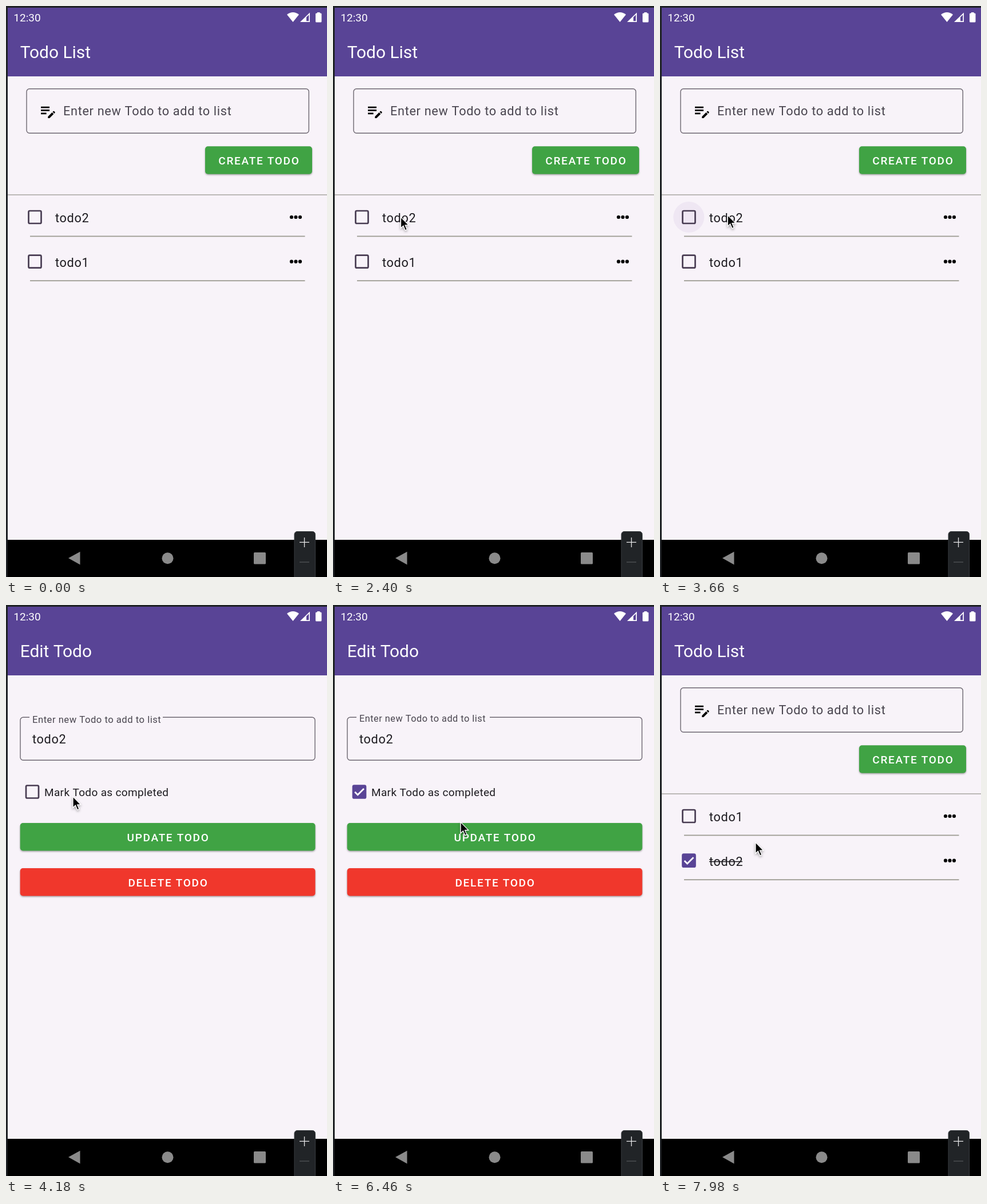
An HTML page with a canvas for the animation above (8 s loop, 561 by 998 pixels).

```html
<!DOCTYPE html>
<html lang="en">
<head>
<meta charset="utf-8">
<title>Todo app</title>
<style>
html, body { margin: 0; width: 100%; height: 100%; overflow: hidden; background: #202124; }
canvas { display: block; }
</style>
</head>
<body>
<canvas id="stage" width="561" height="998"></canvas>
<script>
const ctx = document.getElementById('stage').getContext('2d');
const LOOP = 8000;
const PURPLE = '#594496', PAPER = '#f8f3f9', INK = '#1d1b20', GREEN = '#40a344', RED = '#f0372c';
const HINT = 'Enter new Todo to add to list';

const clamp = v => Math.max(0, Math.min(1, v));
const progress = (t, start, end) => clamp((t - start) / (end - start));
const smooth = p => p * p * (3 - 2 * p);
const easeOut = p => 1 - (1 - p) ** 2;
const mix = (a, b, p) => a + (b - a) * p;

// Cursor stops: time, x, y
const cursorStops = [
  [900, 240, 0], [1380, 127.5, 349], [1580, 123, 364], [2300, 118.5, 369],
  [3560, 118.5, 369], [4080, 117, 335], [5900, 117, 335],
  [6650, 243, 388], [7300, 243, 388], [7900, 167, 415]
];

function text(str, x, y, size, color, { weight = 400, spacing = 0, align = 'left' } = {}) {
  ctx.font = `${weight} ${size}px Roboto, sans-serif`;
  ctx.letterSpacing = spacing * size + 'px';
  ctx.textAlign = align;
  ctx.fillStyle = color;
  ctx.fillText(str, x, y);
}

function rect(x, y, w, h, color) {
  ctx.fillStyle = color;
  ctx.fillRect(x, y, w, h);
}

function roundRect(x, y, w, h, r) {
  ctx.beginPath();
  ctx.roundRect(x, y, w, h, r);
}

function circle(x, y, r, color) {
  ctx.beginPath();
  ctx.arc(x, y, r, 0, 7);
  ctx.fillStyle = color;
  ctx.fill();
}

function polygon(points, color) {
  ctx.beginPath();
  points.forEach(([x, y]) => ctx.lineTo(x, y));
  ctx.closePath();
  ctx.fillStyle = color;
  ctx.fill();
}

function line(points, color, width) {
  ctx.beginPath();
  points.forEach(([x, y]) => ctx.lineTo(x, y));
  ctx.strokeStyle = color;
  ctx.lineWidth = width;
  ctx.stroke();
}

function outline(x, y, w, h) {
  roundRect(x, y, w, h, 5);
  ctx.strokeStyle = '#6c6670';
  ctx.lineWidth = 1.4;
  ctx.stroke();
}

function button(label, x, y, w, color, lift = 0, overlay) {
  const h = 48.5;
  ctx.save();
  ctx.shadowColor = `rgba(0,0,0,${mix(0.35, 0.3, lift)})`;
  ctx.shadowBlur = mix(3, 11, lift);
  ctx.shadowOffsetY = mix(1.5, 5, lift);
  roundRect(x, y, w, h, 5);
  ctx.fillStyle = color;
  ctx.fill();
  ctx.restore();
  if (overlay) {
    ctx.save();
    roundRect(x, y, w, h, 5);
    ctx.clip();
    overlay();
    ctx.restore();
  }
  text(label, x + w / 2 + 0.9, y + 32, 19, '#fff', { weight: 500, spacing: 0.0893, align: 'center' });
}

function checkbox(x, y, checked) {
  roundRect(x - 11, y - 11, 22, 22, 2);
  if (checked) {
    ctx.globalAlpha *= mix(0.6, 1, checked);
    ctx.fillStyle = PURPLE;
    ctx.fill();
    ctx.globalAlpha /= mix(0.6, 1, checked);
  }
  ctx.strokeStyle = checked ? PURPLE : '#483c52';
  ctx.lineWidth = 2.7;
  ctx.stroke();
  if (checked) {
    ctx.save();
    ctx.translate(x - 2 * (1 - checked), y + 1.5 * (1 - checked));
    ctx.scale(checked, checked);
    line([[-7.8, 0.3], [-2.8, 5.3], [8, -5.5]], '#fff', 2.7);
    ctx.restore();
  }
}

function statusBar() {
  rect(3, 3, 558, 120, PURPLE);
  text('12:30', 13.3, 27, 19, '#fff');
  ctx.beginPath();
  ctx.moveTo(501.5, 28);
  ctx.lineTo(491, 15);
  ctx.quadraticCurveTo(501.5, 7, 512, 15);
  ctx.closePath();
  ctx.fillStyle = '#fff';
  ctx.fill();
  polygon([[514, 28], [531, 11.5], [531, 28]], '#fff');
  polygon([[525, 19.5], [529.3, 15.5], [529.3, 26.3], [525, 26.3]], PURPLE);
  roundRect(541, 12.5, 10.5, 16, 1.5);
  ctx.fillStyle = '#fff';
  ctx.fill();
  rect(544, 11, 4.5, 3, '#fff');
}

function page(title) {
  rect(3, 123, 558, 810, PAPER);
  statusBar();
  text(title, 24.7, 91, 29.86, '#fff');
}

function todoRow(label, y, done) {
  checkbox(50.5, y, done ? 1 : 0);
  text(label, 86, y + 9, 21.7, INK, { spacing: 0.03125 });
  if (done) rect(86, y + 1, 58, 1.6, INK);
  for (const x of [499, 506.5, 514]) circle(x, y, 3.1, '#000');
  rect(42, y + 32.6, 480.5, 1.8, '#9c9b91');
}

const noteIcon = new Path2D('M3 10h11v2H3zM3 8h11V6H3zM3 16h7v-2H3zM18 12.9l.7-.7c.4-.4 1-.4 1.4 0l.7.7c.4.4.4 1 0 1.4l-.7.7zM17.3 13.6l-5.3 5.3V21h2.1l5.3-5.3z');

function listPage(t) {
  page('Todo List');
  outline(36, 144.8, 493.3, 77.5);
  ctx.save();
  ctx.translate(57, 167.5);
  ctx.scale(1.36, 1.36);
  ctx.fillStyle = '#000';
  ctx.fill(noteIcon);
  ctx.restore();
  text(HINT, 100, 191, 21.7, '#49454f', { spacing: 0.03125 });
  button('CREATE TODO', 348, 245.3, 187, GREEN);
  rect(3, 329.4, 558, 1.3, '#9c9b95');

  if (t > 3160 && t < 3800) {
    const p = easeOut(progress(t, 3160, 3340));
    const fade = 1 - progress(t, 3550, 3800);
    circle(50.3, 369, 27 * p, `rgba(95,60,155,${0.11 * fade})`);
  }
  const completed = t > 6000;
  todoRow(completed ? 'todo1' : 'todo2', 369, false);
  todoRow(completed ? 'todo2' : 'todo1', 446.7, completed);
}

function updateRipple(t) {
  const fade = 1 - progress(t, 7230, 7420);
  [[0, 0.2], [14, 0.25]].forEach(([delay, alpha]) => {
    const p = easeOut(progress(t, 6903 + delay, 7203 + delay));
    if (p) circle(mix(243, 282.5, p), 405, 262 * p, `rgba(255,255,255,${alpha * fade})`);
  });
}

function editPage(t) {
  page('Edit Todo');
  outline(25, 196.3, 515, 75);
  rect(41, 194, 233, 5, PAPER);
  const label = easeOut(progress(t, 4040, 4225));
  text(HINT, 46, mix(242, 203.5, label), mix(21.7, 16.3, label), '#49454f', { spacing: 0.03125 });
  if (label > 0.7) text('todo2', 46, 242, 21.7, INK, { spacing: 0.03125 });

  if (t > 5390 && t < 5900) {
    const p = easeOut(progress(t, 5390, 5530));
    const fade = 1 - progress(t, 5620, 5900);
    circle(mix(66, 46.5, p), 326.7, 27 * p, `rgba(95,45,155,${0.17 * fade})`);
  }
  checkbox(46, 326.5, progress(t, 5435, 5535));
  text('Mark Todo as completed', 67, 333.5, 19, INK, { spacing: 0.018 });

  const lift = progress(t, 6903, 7050) * (1 - progress(t, 7230, 7420));
  button('UPDATE TODO', 24.7, 381, 515.8, GREEN, lift, () => updateRipple(t));
  button('DELETE TODO', 24.7, 460, 515.8, RED);
}

function systemBars() {
  rect(0, 0, 561, 3, '#202327');
  rect(0, 0, 2.6, 998, '#202327');
  rect(2.6, 933, 559, 65, '#000');
  polygon([[109, 965], [129.5, 953.8], [129.5, 976.5]], '#8a8a8a');
  circle(282.5, 965.2, 10, '#8a8a8a');
  roundRect(433, 955, 21, 20.5, 1.5);
  ctx.fillStyle = '#8a8a8a';
  ctx.fill();
  roundRect(504, 918.5, 36.5, 90, 5);
  ctx.fillStyle = '#212427';
  ctx.fill();
  ctx.strokeStyle = '#393c40';
  ctx.lineWidth = 1;
  ctx.stroke();
  rect(513, 936.7, 17, 1.3, '#e4e5e6');
  rect(520.9, 929, 1.3, 17, '#e4e5e6');
  rect(513, 971.4, 17, 1.2, '#55585b');
}

function cursor(t) {
  if (t < cursorStops[0][0]) return;
  let [, x, y] = cursorStops[cursorStops.length - 1];
  const next = cursorStops.findIndex(stop => stop[0] > t);
  if (next > 0) {
    const [t0, x0, y0] = cursorStops[next - 1], [t1, x1, y1] = cursorStops[next];
    const p = smooth(progress(t, t0, t1));
    x = mix(x0, x1, p);
    y = mix(y0, y1, p);
  }
  ctx.save();
  ctx.translate(x, y);
  ctx.shadowColor = 'rgba(0,0,0,.35)';
  ctx.shadowBlur = 4;
  ctx.shadowOffsetY = 2;
  polygon([[-0.8, -1.5], [-0.8, 21], [4.2, 16.4], [7.4, 24], [11.6, 22.2], [8.5, 14.8], [15.2, 14.6]], '#fff');
  ctx.shadowColor = 'transparent';
  polygon([[0.6, 1.5], [0.6, 17.8], [4.6, 14.1], [8.1, 22.2], [10, 21.3], [6.6, 13.4], [12.2, 13.2]], '#000');
  ctx.restore();
}

function draw(t) {
  ctx.clearRect(0, 0, 561, 998);
  const edit = progress(t, 3920, 4040) * (1 - progress(t, 7420, 7530));
  if (edit < 1) listPage(t);
  if (edit > 0) {
    ctx.save();
    ctx.globalAlpha = edit;
    editPage(t);
    ctx.restore();
  }
  systemBars();
  cursor(t);
}

const start = performance.now();
function tick() {
  draw((performance.now() - start) % LOOP);
  requestAnimationFrame(tick);
}
tick();
</script>
</body>
</html>
```
